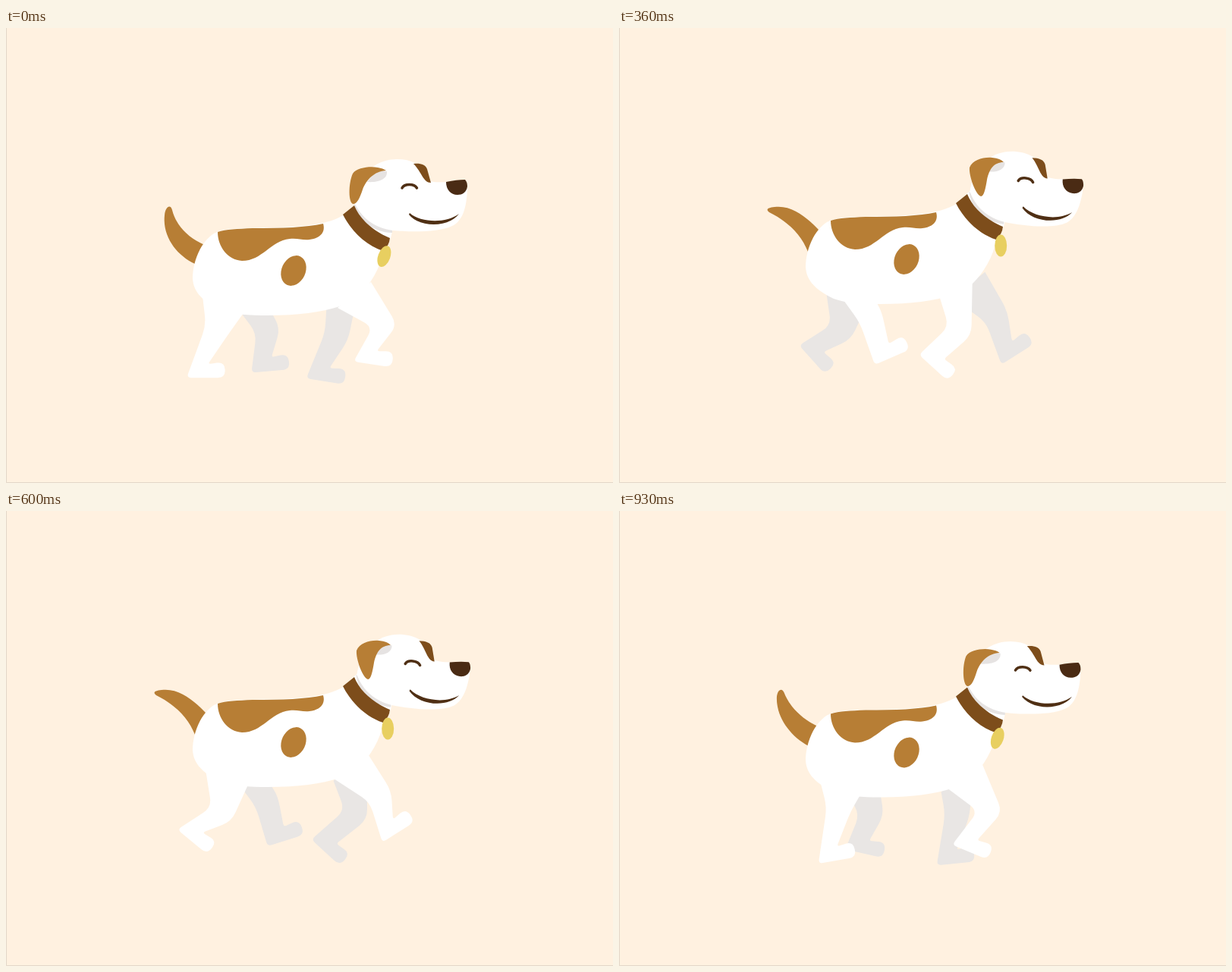
An HTML page that plays this animation: 800 px wide and 600 px high, repeating every 0.96 s.

```html
<!DOCTYPE html>
<html lang="en">
<head>
<meta charset="utf-8">
<title>Walking dog</title>
<style>
  html, body { margin: 0; width: 100%; height: 100%; overflow: hidden; background: #fff1e0; }
  svg { display: block; width: 800px; height: 600px; }
</style>
</head>
<body>
<svg viewBox="0 0 800 600">
  <rect width="800" height="600" fill="#fff1e0"/>
  <path d="M.5 0V599.5H800" fill="none" stroke="#e2d7c9"/>
  <g fill="#e9e6e4">
    <path id="farRear"/>
    <path id="farFront"/>
  </g>
  <path id="tail" fill="#b77e35"/>
  <g fill="#fff">
    <path id="nearRear"/>
    <path id="nearFront"/>
  </g>
  <g id="body">
    <path fill="#fff" d="M459 233C450 247 435 253 418 257C395 262 365 263 325 264C300 264 285 265 274 271C254 284 246 312 246 330C247 350 262 362 283 372C300 378 320 379 345 379C385 379 415 375 440 367L466 352C480 338 493 318 498 292L507 277L510 264L480 215Z"/>
    <g fill="#b77e35">
      <path d="M279 269C290 265 305 265 325 264C365 264 395 263 418 258C421 268 416 277 400 279C390 280 385 277 374 278C348 281 338 307 311 307C292 306 279 288 279 269Z"/>
      <ellipse cx="379" cy="320" rx="15.7" ry="20.7" transform="rotate(25 379 320)"/>
    </g>
    <g id="head">
      <path fill="#e6e3e2" d="M459 232C464 255 486 270 509 270L509 260Z"/>
      <path fill="#fff" d="M460 232C462 200 480 174 515 173C535 173 547 180 553 195C557 203 562 204 580 203L606 202Q609 212 607 225C605 243 599 256 588 261C570 270 530 269 510 267C487 264 470 252 460 232Z"/>
      <path fill="#e6e3e2" d="M476 203C490 204 503 200 502 189L488 187Z"/>
      <path fill="#7d4d1b" d="M537 179C546 178 553 180 555 186L560 204C550 204 548 190 537 179Z"/>
      <path fill="#4a2b14" d="M580 203Q594 200 605 200Q608 203 608 209C607 217 601 220 595 220C586 220 580 213 580 203Z"/>
      <path fill="#4f2f14" d="M532 244C547 257 580 258 597 245C584 263 546 264 531 246Z"/>
      <path fill="none" stroke="#4f2f14" stroke-width="3.5" stroke-linecap="round" d="M522 211C525 205 538 205 541.5 211"/>
    </g>
    <path fill="#7d4d1b" d="M459 234C466 252 484 268 506 277Q505 287 497 294C475 287 455 268 444 246Z"/>
  </g>
  <path id="ear" fill="#b77e35"/>
  <ellipse id="tag" cx="503.2" cy="302" rx="8" ry="14.5" fill="#e8cf60"/>
</svg>
<script>
const CYCLE = 480, STEP = 30, BOB = 15;
const $ = id => document.getElementById(id);

// Value that swings once per stride, with a smaller part at double speed
const swing = (a, mean, c, s, c2 = 0, s2 = 0) =>
  mean + c * Math.cos(a) + s * Math.sin(a) + c2 * Math.cos(2 * a) + s2 * Math.sin(2 * a);

// Joint motion; r scales the length of the stride
const rear = (a, r) => ({
  hip: [swing(a, 301, -14 * r, -10 * r), swing(a, 357, 0, 0, 6)],
  knee: [swing(a, 310, -33.5 * r, -24 * r, 2), swing(a, 394, 0.5, 9, 3)],
  ankle: [swing(a, 296, -45.4 * r, -51.4 * r, 1.5), swing(a, 436, 4.6, -4.1, 10.6, -5)],
  pitch: swing(a, -1, 10, 31.6, -9),
  thigh: [28, 10]
});
const front = (a, r) => ({
  hip: [swing(a, 449, 10 * r, 5 * r), swing(a, 344, 0, 0, 8)],
  knee: [swing(a, 470, 31 * r, 22 * r, -1.5), swing(a, 393, -5, -11.5, 5)],
  ankle: [swing(a, 451.5, 28 * r, 45 * r, -6), swing(a, 435, -11, -6, 8, -5)],
  pitch: swing(a, 5, 3.5, -37.5),
  thigh: [22, -17]
});
const legs = [
  { id: 'nearRear', gait: rear, phase: 0, reach: 1, dx: 0, dy: 0, tilt: 0 },
  { id: 'nearFront', gait: front, phase: 0, reach: 1, dx: 0, dy: 0, tilt: 0 },
  { id: 'farRear', gait: rear, phase: Math.PI - 0.2, reach: 0.85, dx: 10, dy: 1, tilt: 8 },
  { id: 'farFront', gait: front, phase: Math.PI + 0.2, reach: 1.18, dx: 8, dy: 2, tilt: 0 }
];

// Heel, toe bottom, toe top and instep around the ankle
const foot = [[-14, 10], [37, 10], [36, -11], [14, -8]];
const corners = [0, 13, 6, 10, 10, 4, 13, 0];

// Parts that bend between the low and the high pose
const bends = {
  tail: [
    'M249 311C225 300 206 275 209 247C210 235 217 232 219 240C224 260 240 277 262 286L275 310Z',
    'M249 295C240 272 222 255 198 243C193 239 196 237 205 236C228 233 248 250 264 267L275 295Z'
  ],
  ear: [
    'M458 232C451 232 451 205 457 192C462 184 480 182 490 184Q497 185 501 188C485 189 475 200 470 213C467 222 463 232 458 232Z',
    'M477 222C470 220 461 195 462 184C466 174 480 170 492 171Q503 172 507 177C494 177 488 186 485 200C483 212 481 222 477 222Z'
  ]
};

function blend([low, high], k) {
  const to = high.match(/[\d.]+/g);
  let i = 0;
  return low.replace(/[\d.]+/g, v => (+v + (to[i++] - v) * k).toFixed(2));
}

const add = (p, x, y) => [p[0] + x, p[1] + y];

function unit(p, q) {
  const x = q[0] - p[0], y = q[1] - p[1], d = Math.hypot(x, y) || 1;
  return [x / d, y / d];
}

function toward(p, q, r) {
  const [x, y] = unit(p, q);
  const d = Math.min(r, Math.hypot(q[0] - p[0], q[1] - p[1]) / 2);
  return add(p, x * d, y * d);
}

function rounded(pts) {
  const n = pts.length;
  const parts = pts.map((p, i) => {
    const from = toward(p, pts[(i + n - 1) % n], corners[i]);
    const to = toward(p, pts[(i + 1) % n], corners[i]);
    return `${from}Q${p} ${to}`;
  });
  return 'M' + parts.join('L') + 'Z';
}

function legPath({ gait, phase, reach, dx, dy, tilt }, a) {
  const { hip, knee, ankle, pitch, thigh } = gait(a + phase, reach);
  // The knee is widest across the line that halves its bend
  const up = unit(hip, knee), down = unit(knee, ankle);
  const [bx, by] = unit([0, 0], add(up, ...down));
  const kx = by * 16, ky = -bx * 16;
  const angle = (pitch + tilt) * Math.PI / 180;
  const c = Math.cos(angle), s = Math.sin(angle);
  const pts = [
    add(hip, -thigh[0], -thigh[1]),
    add(knee, -kx, -ky),
    ...foot.map(([x, y]) => add(ankle, x * c - y * s, x * s + y * c)),
    add(knee, kx, ky),
    add(hip, ...thigh)
  ];
  return rounded(pts.map(p => add(p, dx, dy)));
}

function draw(time) {
  const t = Math.floor(time / STEP) * STEP % CYCLE;
  const a = 2 * Math.PI * t / CYCLE;
  const k = Math.pow(Math.sin(a) ** 2, 1.2);
  const lift = `translate(0 ${-BOB * k})`;
  for (const leg of legs) $(leg.id).setAttribute('d', legPath(leg, a));
  for (const id in bends) $(id).setAttribute('d', blend(bends[id], k));
  $('body').setAttribute('transform', lift);
  $('head').setAttribute('transform', `rotate(${6 * k} 472 254)`);
  $('tag').setAttribute('transform', `${lift} rotate(${20 * Math.cos(a)} 503.2 288)`);
}

let start;
function tick(now) {
  start ??= now;
  draw(now - start);
  requestAnimationFrame(tick);
}
draw(0);
requestAnimationFrame(tick);
</script>
</body>
</html>
```
